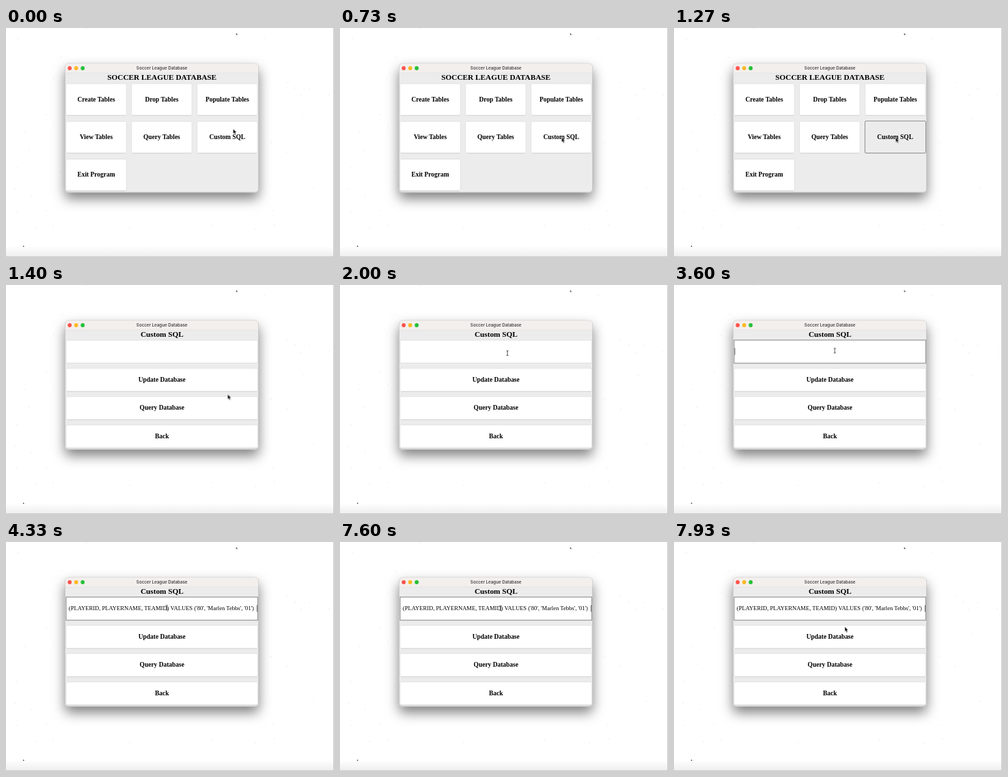
An HTML page for the animation above (8000 ms loop, 480 by 336 pixels).

```html
<!DOCTYPE html>
<html lang="en">
<head>
<meta charset="utf-8">
<title>Soccer League Database</title>
<style>
html, body { margin: 0; width: 100%; height: 100%; overflow: hidden; background: #fff; }
svg { display: block; width: 100%; height: 100%; }
text { text-anchor: middle; font-kerning: none; }
.heading { font: bold 11.28px "Liberation Serif", serif; }
.button text { font: bold 9.45px "Liberation Serif", serif; }
.button rect { fill: #fff; stroke: #dcdcdc; stroke-width: .7; }
.caption { font: 600 6.2px Inter, sans-serif; fill: #454545; }
.query { font: 8.57px "Liberation Serif", serif; text-anchor: start; }
.focus { fill: none; stroke: #85858a; stroke-width: .9; }
.caret { stroke: #555; stroke-width: .9; }

/* Everything changes in hard steps over one 8 s loop. */
.anim { animation: 8s step-end infinite; }
#menu { animation-name: menu; }
#pressed { animation-name: pressed; }
#editor { animation-name: editor; }
#focus { animation-name: focus; }
#blink { animation-name: blink; }
#typed { animation-name: typed; }
#pointer { animation-name: move; }
#arrow { animation-name: arrow; }
#beam { animation-name: beam; }

@keyframes menu { 0% { opacity: 1 } 17.5%, 100% { opacity: 0 } }
@keyframes editor { 0% { opacity: 0 } 17.5%, 100% { opacity: 1 } }
@keyframes pressed { 0% { opacity: 0 } 15.875%, 100% { opacity: 1 } }
@keyframes focus { 0% { opacity: 0 } 31.625%, 100% { opacity: 1 } }
@keyframes blink {
  0%, 39.125%, 51.625%, 100% { opacity: 0 }
  32.5%, 45% { opacity: 1 }
}
@keyframes typed { 0% { opacity: 0 } 54.125%, 100% { opacity: 1 } }
@keyframes arrow { 0%, 97.5%, 100% { opacity: 1 } 24.125% { opacity: 0 } }
@keyframes beam { 0%, 97.5%, 100% { opacity: 0 } 24.125% { opacity: 1 } }
@keyframes move {
  0% { transform: translate(332.4px, 148px) }
  1.625% { transform: translate(329.5px, 154.5px) }
  3.375% { transform: translate(328.5px, 157.5px) }
  4.375% { transform: translate(326.5px, 160.5px) }
  5.5% { transform: translate(325px, 162px) }
  6.625% { transform: translate(324.5px, 161px) }
  9.125% { transform: translate(324.4px, 160.4px) }
  20.875% { transform: translate(322px, 159px) }
  21.625% { transform: translate(312px, 150px) }
  22.5% { transform: translate(293px, 135px) }
  23.375% { transform: translate(272px, 119px) }
  24.125% { transform: translate(256px, 107px) }
  25% { transform: translate(245px, 100px) }
  25.875% { transform: translate(239px, 96px) }
  26.625% { transform: translate(236.5px, 95.5px) }
  27.5% { transform: translate(235.3px, 96.3px) }
  95% { transform: translate(235px, 97px) }
  95.875% { transform: translate(236px, 100px) }
  96.625% { transform: translate(240px, 109px) }
  97.5% { transform: translate(247px, 124px) }
  98.375% { transform: translate(250px, 130px) }
  99.125%, 100% { transform: translate(250px, 124.3px) }
}
</style>
</head>
<body>
<svg viewBox="0 0 480 336" preserveAspectRatio="none">
  <defs>
    <filter id="shadow" x="-20%" y="-20%" width="140%" height="150%">
      <feDropShadow dx="0" dy="9" stdDeviation="9" flood-opacity=".5"/>
    </filter>
    <linearGradient id="fade" x2="0" y2="1">
      <stop offset="0" stop-color="#fff"/>
      <stop offset="1" stop-color="#ededed"/>
    </linearGradient>
  </defs>

  <rect width="480" height="336" fill="#fff"/>
  <rect y="320" width="480" height="16" fill="url(#fade)"/>
  <g id="specks" fill="#d4d4d4"></g>
  <path d="M336.6 8.4l1.2.6.2 1.4M25 319.7l1.3 1" fill="none" stroke="#222" stroke-width="1.1"/>
  <path d="M479.5 0V336M0 335.6H480" stroke="#c4c4c4" stroke-width=".9"/>

  <rect x="86.5" y="52" width="283" height="189" rx="5" fill="#ececec" stroke="#b5b5b5" stroke-width=".6" filter="url(#shadow)"/>
  <path d="M86.8 66V57a4.7 4.7 0 0 1 4.7-4.7H364.5a4.7 4.7 0 0 1 4.7 4.7V66Z" fill="#f3efed"/>
  <path d="M86.8 66H369.2" stroke="#dedbd9" stroke-width=".5"/>
  <circle cx="93.2" cy="59" r="2.9" fill="#ff544d"/>
  <circle cx="102.7" cy="59" r="2.9" fill="#fdb924"/>
  <circle cx="112.2" cy="59" r="2.9" fill="#25c138"/>
  <text class="caption" x="228.2" y="61.2">Soccer League Database</text>

  <g id="menu" class="anim">
    <text class="heading" x="228.2" y="76">SOCCER LEAGUE DATABASE</text>
    <g id="menuButtons"></g>
    <g id="pressed" class="anim button">
      <rect x="279.5" y="136.5" width="89" height="47" rx="1.5" style="fill:#ececec;stroke:#85858a;stroke-width:.9"/>
      <text x="323.6" y="162.8">Custom SQL</text>
    </g>
  </g>

  <g id="editor" class="anim">
    <text class="heading" x="228.4" y="76">Custom SQL</text>
    <rect x="88" y="81" width="280.5" height="33.5" fill="#fff" stroke="#d6d6d6" stroke-width=".7"/>
    <g id="editorButtons"></g>
    <rect id="focus" class="anim focus" x="88" y="80.8" width="280.5" height="34"/>
    <path id="blink" class="anim caret" d="M89 92.5V102.5"/>
    <g id="typed" class="anim">
      <text class="query" x="91.8" y="100.3">(PLAYERID, PLAYERNAME, TEAMID) VALUES ('80', 'Marlen Tebbs', '01')</text>
      <path class="caret" d="M367.3 92.5V102.5"/>
    </g>
  </g>

  <g id="pointer" class="anim">
    <path id="arrow" class="anim" d="M0 0V7.2L1.6 5.8 2.7 8.4 4 7.8 2.9 5.3H5Z" fill="#000" stroke="#fff" stroke-width=".5"/>
    <path id="beam" class="anim" d="M-1.5-3.6Q0-3.6 0-2.6 0-3.6 1.5-3.6M0-2.8V2.8M-1.5 3.6Q0 3.6 0 2.6 0 3.6 1.5 3.6" fill="none" stroke="#222" stroke-width=".8"/>
  </g>
</svg>
<script>
const byId = id => document.getElementById(id);

const button = (label, x, y, width, height) => `
  <g class="button">
    <rect x="${x}" y="${y}" width="${width}" height="${height}" rx="2"/>
    <path d="M${x + 1.5} ${y + height + .3}h${width - 3}" stroke="#c8c8c8" stroke-width=".6"/>
    <text x="${x + width / 2}" y="${y + height / 2 + 2.7}">${label}</text>
  </g>`;

byId('menuButtons').innerHTML = [
  'Create Tables', 'Drop Tables', 'Populate Tables',
  'View Tables', 'Query Tables', 'Custom SQL', 'Exit Program'
].map((label, i) =>
  button(label, 87.8 + i % 3 * 95.9, 81.8 + Math.floor(i / 3) * 55.3, 88.4, 46.3)
).join('');

byId('editorButtons').innerHTML = ['Update Database', 'Query Database', 'Back']
  .map((label, i) => button(label, 88, 122.2 + i * 41.5, 280.5, 33.8)).join('');

const specks = [
  [18, 16], [117, 1], [378, 15], [81, 43], [69, 74], [411, 80], [444, 89],
  [423, 88], [473, 98], [432, 99], [59, 127], [436, 132], [70, 146], [28, 153],
  [388, 168], [411, 182], [34, 179], [16, 205], [80, 211], [448, 234], [13, 236],
  [37, 246], [59, 268], [16, 269], [391, 268], [393, 289], [43, 293], [69, 290],
  [300, 290], [365, 295], [181, 294]
];
byId('specks').innerHTML = specks
  .map(([x, y]) => `<circle cx="${x}" cy="${y}" r=".6"/>`).join('');
</script>
</body>
</html>
```
